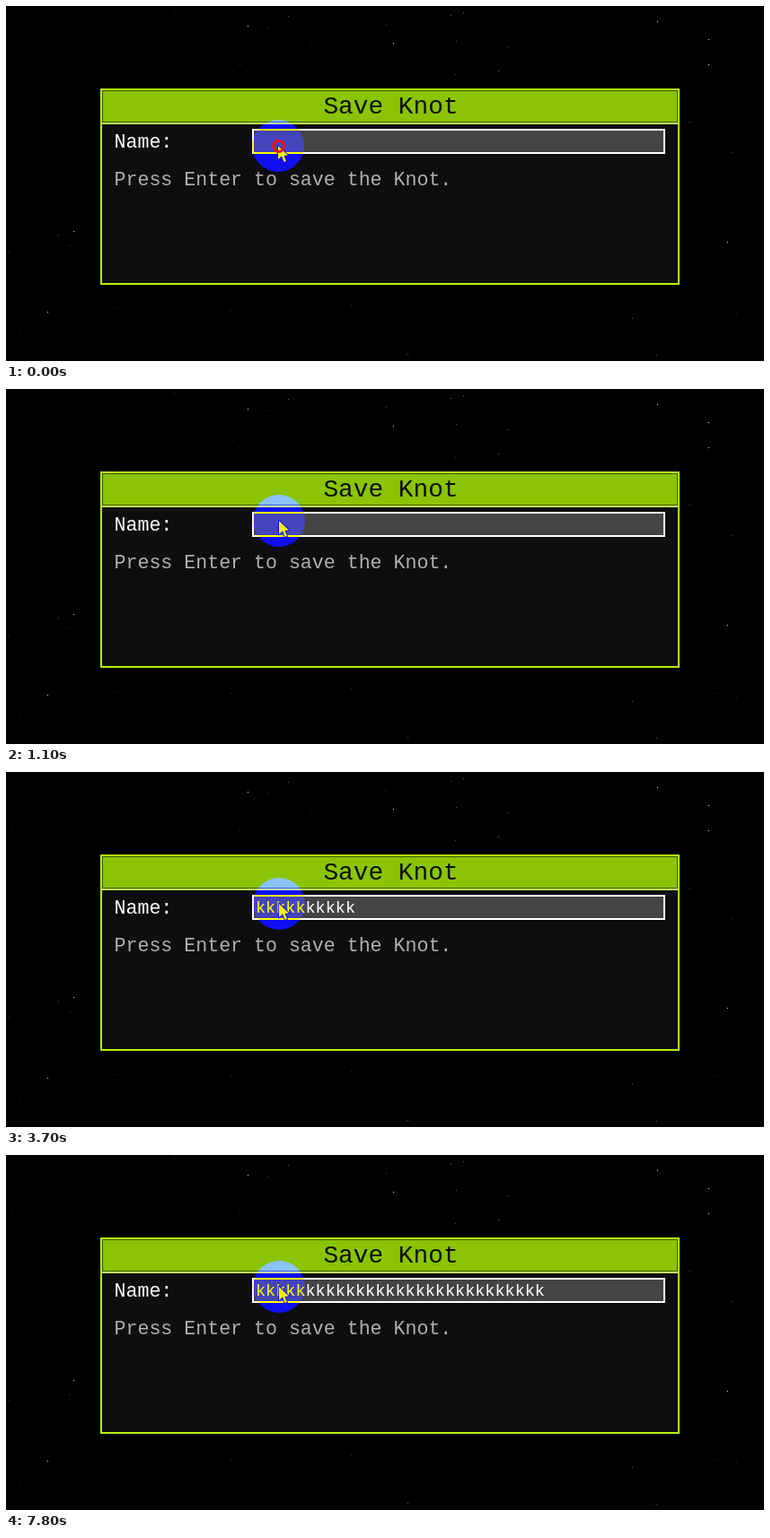
An HTML page with a canvas that plays this animation: 844 px wide and 396 px high, repeating every 8000 ms.

```html
<!DOCTYPE html>
<html lang="en">
<head>
<meta charset="utf-8">
<title>Save Knot</title>
<style>
  html, body { margin: 0; width: 100%; height: 100%; overflow: hidden; background: #000; }
  canvas { display: block; }
</style>
</head>
<body>
<canvas id="stage" width="844" height="396"></canvas>
<script>
const ctx = document.getElementById('stage').getContext('2d');
const LOOP = 8000;
const FONT = '"Liberation Mono", "DejaVu Sans Mono", monospace';
const LIME = '#b4f010';

// Held key: first letter, repeat interval, longest name
const TYPE_START = 1800, TYPE_STEP = 211, TYPE_MAX = 29;

const brightStars = [
  [725, 17], [782, 37], [782, 65], [431, 41], [269, 22], [803, 263], [46, 341], [75, 251]
];

function random(seed) {
  return () => (seed = (seed * 16807) % 2147483647) / 2147483647;
}

function rect(color, x, y, w, h) {
  ctx.fillStyle = color;
  ctx.fillRect(x, y, w, h);
}

function frame(color, x, y, w, h, line) {
  ctx.strokeStyle = color;
  ctx.lineWidth = line;
  ctx.strokeRect(x + line / 2, y + line / 2, w - line, h - line);
}

function text(str, x, y, size, color, align = 'left') {
  ctx.font = `${size}px ${FONT}`;
  ctx.textAlign = align;
  ctx.fillStyle = color;
  ctx.fillText(str, x, y);
}

function sky() {
  rect('#000', 0, 0, 844, 396);
  const rnd = random(77);
  for (let i = 0; i < 110; i++) {
    const v = 20 + 80 * rnd() ** 3 | 0;
    rect(`rgb(${v},${v},${v})`, rnd() * 844 | 0, rnd() * 390 | 0, 1, 1);
  }
  for (const [x, y] of brightStars) rect('#ddd', x, y, 1, 1);
}

function dialog(typed) {
  rect('#0e0e0e', 105, 92, 645, 219);
  rect('#8ac404', 107, 94, 641, 36);
  frame('#3c5800', 107, 94, 641, 36, 1);
  rect('#c4f45c', 107, 130, 641, 2);
  frame(LIME, 105, 92, 645, 219, 2);
  text('Save Knot', 428.5, 119.5, 27.8, '#0a1000', 'center');
  text('Name:', 120.5, 157.5, 21.6, '#fff');
  text('Press Enter to save the Knot.', 120.5, 199.5, 21.6, '#b0b0b0');
  rect('#444', 274, 137, 460, 28);
  frame('#fff', 274, 137, 460, 28, 2);
  text('k'.repeat(typed), 278, 157, 18.5, '#fff');
}

function arrow(x, y) {
  const shape = [[0, 0], [0, 15], [4, 11.5], [6.5, 18], [9, 17], [6.5, 11], [11, 10.5]];
  ctx.beginPath();
  for (const [dx, dy] of shape) ctx.lineTo(x + dx, y + dy);
  ctx.closePath();
  ctx.strokeStyle = '#000';
  ctx.lineWidth = 1.5;
  ctx.stroke();
  ctx.fillStyle = '#eee';
  ctx.fill();
}

function disc(x, y, r) {
  ctx.beginPath();
  ctx.arc(x, y, r, 0, 2 * Math.PI);
}

function pointer(t) {
  const p = Math.min(t / 900, 1);
  const x = 303 + p, y = 156 - 9 * p ** 1.2;
  arrow(x, y);

  // Inverting the blue channel gives the spotlight
  ctx.globalCompositeOperation = 'difference';
  ctx.fillStyle = '#00f';
  disc(x, y, 29);
  ctx.fill();
  ctx.globalCompositeOperation = 'source-over';

  if (t < 200) {
    ctx.strokeStyle = '#f01028';
    ctx.lineWidth = 3;
    disc(x + 0.5, y + 0.5, 6);
    ctx.stroke();
  }
}

function typedCount(t) {
  const n = Math.floor((t - TYPE_START) / TYPE_STEP) + 1;
  return Math.max(0, Math.min(n, TYPE_MAX));
}

function draw(t) {
  sky();
  dialog(typedCount(t));
  pointer(t);
}

const start = performance.now();
function tick() {
  draw((performance.now() - start) % LOOP);
  requestAnimationFrame(tick);
}
tick();
</script>
</body>
</html>
```
